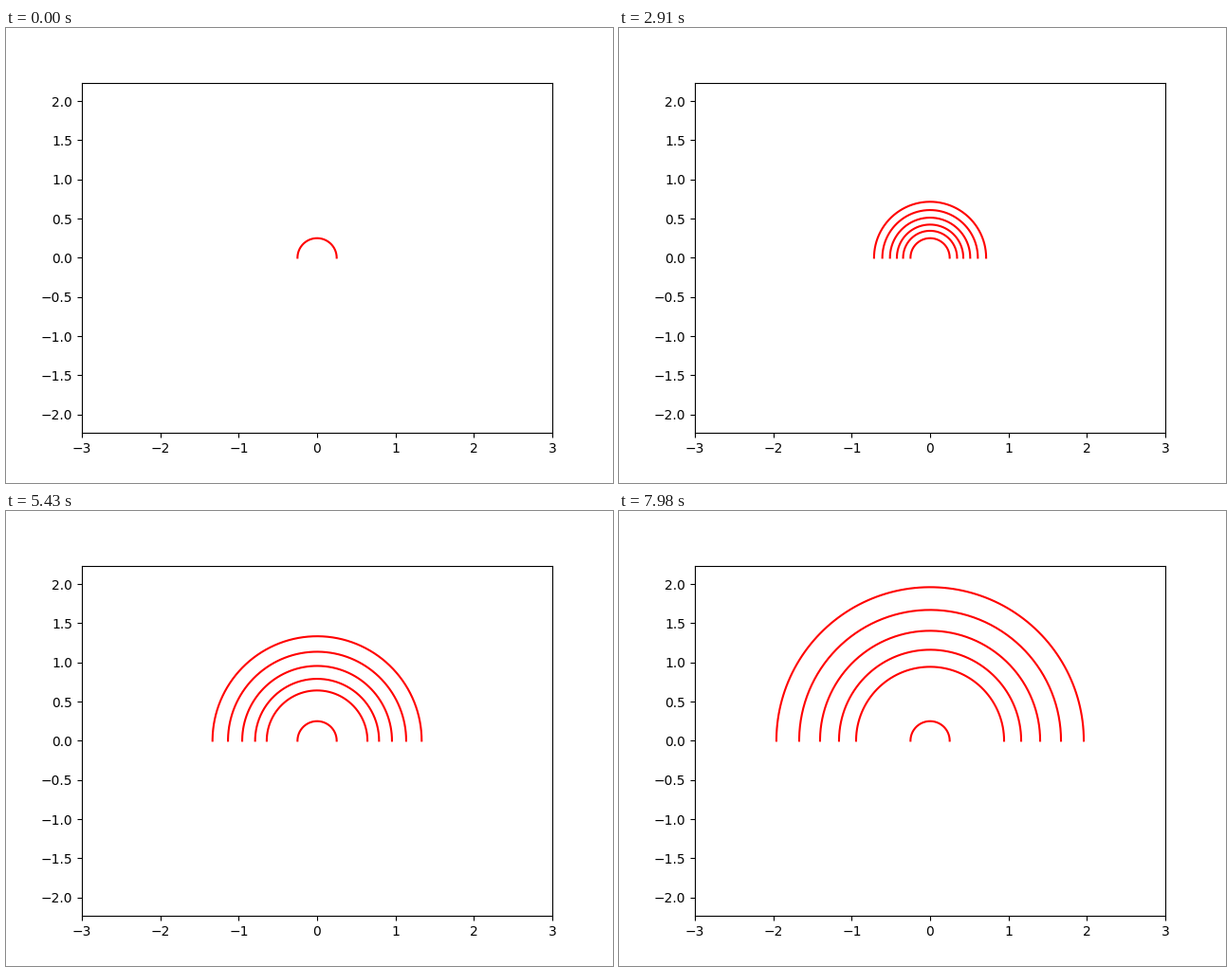
A matplotlib script that plays this animation: 640x480 px, repeating every 8 s.

```python
import numpy as np
import matplotlib.pyplot as plt
from matplotlib.animation import FuncAnimation

INTERVAL = 20      # ms per drawn frame
FRAMES = 400
CORE = 0.25        # radius of the fixed arc

theta = np.linspace(0, np.pi, 200)
arc_x, arc_y = np.cos(theta), np.sin(theta)

# growth of each wave per 30 ms step, in axis units
k = np.arange(1, 6)
speeds = (k**2 + 15 * k + 62) * 4.549e-5

fig, ax = plt.subplots(figsize=(6.4, 4.8), dpi=100)
ax.set_xlim(-3, 3)
ax.set_ylim(-2.2355, 2.2355)

ax.plot(CORE * arc_x, CORE * arc_y, color="red", lw=1.5)
waves = [ax.plot([], [], color="red", lw=1.5)[0] for _ in speeds]


def update(i):
    step = (2 * i + 1) // 3    # the waves advance every 30 ms
    for wave, speed in zip(waves, speeds):
        r = speed * step
        wave.set_data(r * arc_x, r * arc_y)
        wave.set_visible(step > 0)
    return waves


anim = FuncAnimation(fig, update, frames=FRAMES, interval=INTERVAL,
                     init_func=lambda: update(0), repeat=True, repeat_delay=0)
plt.show()
```
